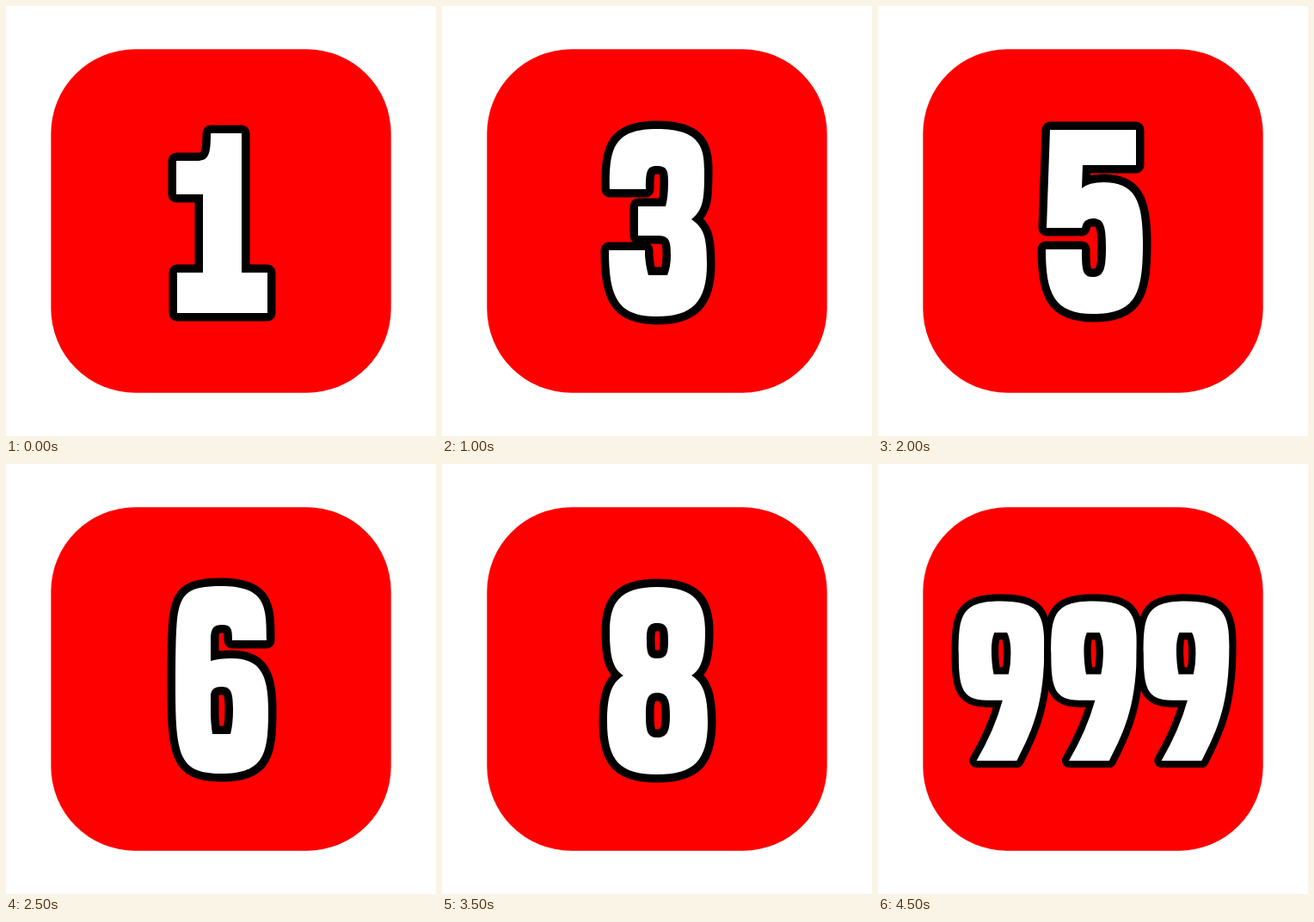
An HTML page that plays this animation: 500 by 500 pixels, repeating every 5 s.

```html
<!DOCTYPE html>
<html lang="en">
<head>
<meta charset="utf-8">
<title>Counter</title>
<style>
  html, body { margin: 0; width: 100%; height: 100%; overflow: hidden; background: #fff; }
  svg { display: block; width: 100%; height: 100%; }
  #count path { fill: #fff; stroke: #000; stroke-width: 19; stroke-linejoin: round; paint-order: stroke; }
</style>
</head>
<body>
<svg viewBox="0 0 500 500" role="img" aria-label="Counter">
  <rect x="52.3" y="50.3" width="395.4" height="399.4" rx="98" fill="#f00"/>
  <g id="count"></g>
</svg>
<script>
const STEP = 500;

// Glyph outlines for 1 to 9, each centred on the stage.
const glyphs = [
  'M238 148H274V310H304V357H199V310H229V219H198V180H222C236 180 238 172 238 148Z',

  'M196 218C194 165 205 146 250 146C297 146 305 168 305 205C305 245 290 262 252 314H304V359H196V318' +
  'C240 258 262 235 262 205C262 193 260 188 250 188C239 188 238 194 238 218Z',

  'M195 213C194 165 200 143 250 143C300 143 305 165 305 190C305 222 305 236 290 248C305 258 308 270 308 300' +
  'C308 345 290 361 250 361C205 361 194 340 194 284H236V290Q237 303 240 313H262Q266 303 266 290' +
  'C266 272 264 267 250 267H228V233H260Q263 222 263 205C263 192 262 186 250 186C238 186 237 192 237 213Z',

  'M252 148H291V283H306V321H291V357H254V321H195V280ZM254 232L233 283H254Z',

  'M200 144H300V185H238L237 212Q245 205 262 205C298 205 308 225 308 275C308 335 300 358 250 358' +
  'C205 358 195 335 195 283H237C237 308 238 315 250 315C263 315 265 305 265 280C265 255 262 247 250 247' +
  'Q239 247 237 258H196Z',

  'M303 205C303 165 302 142 250 142C212 142 203 150 199 180Q197 200 197 250C197 337 199 360 250 360' +
  'C301 360 305 337 305 285C305 244 295 226 262 226Q248 226 238 229V205C238 190 242 187 251 187' +
  'C262 187 263 192 263 205Z' +
  'M238 268Q239 259 250 259C260 259 264 262 264 285Q264 303 261 314H240Q238 300 238 290Z',

  'M197 148H305V172L257 357H208L253 192H197Z',

  'M250 143C295 143 306 162 306 195C306 225 302 238 290 246C304 254 309 270 309 300C309 345 293 361 250 361' +
  'C207 361 192 345 192 300C192 270 197 254 211 246C199 238 195 225 195 195C195 162 206 143 250 143Z' +
  'M250 185C239 185 238 192 238 205C238 221 240 226 250 226C261 226 263 221 263 205C263 192 262 185 250 185Z' +
  'M250 266C239 266 237 274 237 292C237 311 239 318 250 318C262 318 265 311 265 292C265 274 262 266 250 266Z',

  'M194 215C194 165 197 145 250 145C300 145 309 160 309 205C309 280 295 315 272 359H218Q242 318 253 278' +
  'L232 278C198 278 194 260 194 215Z' +
  'M238 210Q238 196 242 187H259Q264 196 264 215Q264 230 261 243H241Q238 228 238 210Z'
].map(d => `<path fill-rule="evenodd" d="${d}"/>`);

const nine = glyphs[8];
const tripleNine = [-107.5, 0, 107.5]
  .map(dx => `<g transform="translate(${33.3 + dx} 34) scale(.866)">${nine}</g>`)
  .join('');
const scenes = [...glyphs, tripleNine];

const count = document.getElementById('count');
let shown = -1;

function draw() {
  const index = Math.floor(performance.now() / STEP) % scenes.length;
  if (index !== shown) {
    count.innerHTML = scenes[index];
    shown = index;
  }
  requestAnimationFrame(draw);
}
draw();
</script>
</body>
</html>
```
